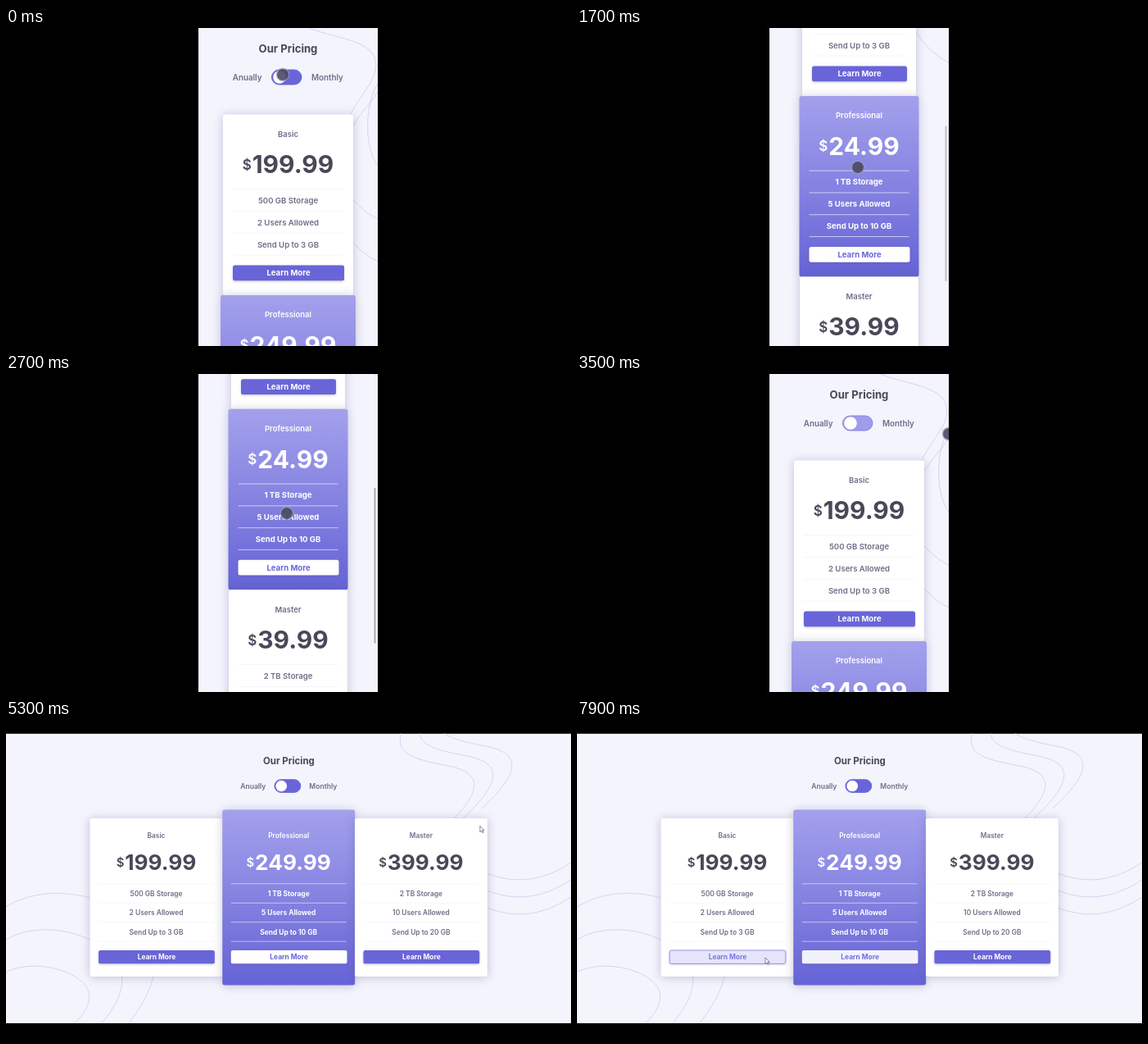
These frames come from a looping animation (690 px wide and 388 px high, 8000 ms). An HTML page with a canvas:

```html
<!DOCTYPE html>
<html lang="en">
<head>
<meta charset="utf-8">
<title>Pricing cards</title>
<style>
  html, body { margin: 0; width: 100%; height: 100%; overflow: hidden; background: #000; }
  canvas { display: block; }
</style>
</head>
<body>
<canvas id="stage" width="690" height="388"></canvas>
<script>
const ctx = document.getElementById('stage').getContext('2d');
const LOOP = 8000, STEP = 100, CUT = 4900;
const CARD_HEIGHT = 220.5, ROW = 26.8, DESKTOP_SCALE = 0.875;
const PURPLE = '#6965d8', LILAC = '#9f9ce9', INK = '#484858', MUTED = '#6f6d87';
const PAPER = '#f4f4fd', LINE = '#d5d4ee';

const PLANS = [
  { name: 'Basic', year: '199.99', month: '19.99', widths: [159, 139],
    items: ['500 GB Storage', '2 Users Allowed', 'Send Up to 3 GB'] },
  { name: 'Professional', year: '249.99', month: '24.99', widths: [165, 146], pro: true,
    items: ['1 TB Storage', '5 Users Allowed', 'Send Up to 10 GB'] },
  { name: 'Master', year: '399.99', month: '39.99', widths: [168, 145],
    items: ['2 TB Storage', '10 Users Allowed', 'Send Up to 20 GB'] },
];

// Timing: progress from 0 to 1 between two moments.
const linear = (t, from, to) => Math.min(1, Math.max(0, (t - from) / (to - from)));
const smooth = (t, from, to) => {
  const p = linear(t, from, to);
  return p * p * (3 - 2 * p);
};
const decelerate = (t, from, to) => 1 - (1 - linear(t, from, to)) ** 1.6;

// Follows moves { from, to, x, y } one after the other.
function travel(t, x, y, moves) {
  for (const move of moves) {
    const p = smooth(t, move.from, move.to);
    x += (move.x - x) * p;
    y += (move.y - y) * p;
  }
  return [x, y];
}

function mix(a, b, p) {
  const channel = (hex, i) => parseInt(hex.slice(1 + 2 * i, 3 + 2 * i), 16);
  return `rgb(${[0, 1, 2].map(i => Math.round(channel(a, i) * (1 - p) + channel(b, i) * p))})`;
}

function box(x, y, w, h, r, fill, shadow = 0, stroke) {
  ctx.save();
  ctx.beginPath();
  ctx.roundRect(x, y, w, h, r);
  ctx.shadowColor = 'rgba(80,80,140,.32)';
  ctx.shadowBlur = shadow;
  ctx.shadowOffsetY = shadow ? 1 : 0;
  ctx.fillStyle = fill;
  ctx.fill();
  ctx.restore();
  if (stroke) {
    ctx.strokeStyle = stroke;
    ctx.lineWidth = 1;
    ctx.stroke();
  }
}

function disc(x, y, r, fill) {
  ctx.beginPath();
  ctx.arc(x, y, r, 0, 7);
  ctx.fillStyle = fill;
  ctx.fill();
}

// Capital letters are centred vertically on y.
function text(str, x, y, size, color, align = 'center', weight = 600) {
  ctx.font = `${weight} ${size}px Inter, sans-serif`;
  ctx.textAlign = align;
  ctx.fillStyle = color;
  ctx.fillText(str, x, y + size * 0.364);
}

function placed(x, y, scale, draw) {
  ctx.save();
  ctx.translate(x, y);
  ctx.scale(scale, scale);
  draw();
  ctx.restore();
}

function panel(x, y, w, h, draw) {
  ctx.save();
  ctx.beginPath();
  ctx.rect(x, y, w, h);
  ctx.clip();
  ctx.fillStyle = PAPER;
  ctx.fillRect(x, y, w, h);
  draw();
  ctx.restore();
}

// Strokes copies of one curve, each placed by a matrix.
function curves(d, count = 1, matrix = () => new DOMMatrix()) {
  ctx.strokeStyle = LINE;
  ctx.lineWidth = 1;
  for (let i = 0; i < count; i++) {
    const path = new Path2D();
    path.addPath(new Path2D(d), matrix(i));
    ctx.stroke(path);
  }
}
const shifted = (dx, dy) => i => new DOMMatrix().translate(dx * i, dy * i);

// Origin: centre of the toggle.
function header(knob, hover) {
  text('Our Pricing', 0, -35, 13.1, INK, 'center', 700);
  text('Anually', -32, 0, 9.8, MUTED, 'right');
  text('Monthly', 28.5, 0, 9.8, MUTED, 'left');
  box(-20, -9, 36.5, 18, 9, mix(PURPLE, LILAC, hover), 0, mix(PURPLE, '#8784df', hover));
  disc(-10.5 + 18 * knob, 0, 7.8, '#fff');
}

// Origin: top centre of the card's content.
function card(plan, width, monthly, extra = 0, hover = 0) {
  const { pro } = plan, left = -width / 2, inner = width - 24;
  const soft = pro ? '#fff' : MUTED, strong = pro ? '#fff' : INK;
  const face = pro ? '#ffffff' : PURPLE, label = pro ? PURPLE : '#ffffff';

  let fill = '#fff';
  if (pro) {
    fill = ctx.createLinearGradient(0, -extra, 0, CARD_HEIGHT + extra);
    fill.addColorStop(0, '#a3a1ec');
    fill.addColorStop(1, '#6663d6');
  }
  box(left, -extra, width, CARD_HEIGHT + 2 * extra, 3, fill, 12);
  text(plan.name, 0, 24, 9.5, soft);

  const price = monthly ? plan.month : plan.year;
  ctx.font = '700 30px Inter, sans-serif';
  const start = -(ctx.measureText(price).width + 12) / 2;
  text('$', start, 61, 17, strong, 'left');
  text(price, start + 12, 61, 30, strong, 'left', 700);

  for (let i = 0; i < 4; i++) {
    ctx.fillStyle = pro ? 'rgba(255,255,255,.6)' : '#f6f6fb';
    ctx.fillRect(left + 12, 90.7 + ROW * i, inner, 1);
    if (i < 3) text(plan.items[i], 0, 105 + ROW * i, 9.6, soft, 'center', pro ? 700 : 600);
  }

  const edge = hover && !pro ? mix(PURPLE, '#8d8ae2', hover) : undefined;
  box(left + 12, 184, inner + 1, 18.7, 2.5, mix(face, '#e5e4fa', hover), 3, edge);
  text('Learn More', 0.5, 193.3, 9.6, mix(label, '#7c79dc', hover), 'center', 700);
}

function mobile(t) {
  const monthly = t >= 500 && t < 3300;
  const scroll = 316 * (decelerate(t, 800, 2300) - smooth(t, 2600, 3100));
  const knob = smooth(t, 400, 600) - smooth(t, 3200, 3400);
  const hover = smooth(t, 300, 600);
  const [x, y] = travel(t, 338, 57, [
    { from: 600, to: 900, x: 343, y: 170 },
    { from: 2900, to: 3100, x: 338, y: 60 },
    { from: 3300, to: 3500, x: 454, y: 73 },
  ]);

  panel(235, 0, 219, 388, () => {
    placed(0, -scroll, 1, () => {
      curves('M370 0C405 14 452 14 452 46C450 72 420 92 414 125');
      curves('M454 78C444 94 432 103 420 126M454 68C437 95 438 148 454 168');
      curves('M410 190C425 214 438 225 454 233', 2, shifted(0, 52));
      placed(344.5, 60, 1, () => header(knob, hover));
      PLANS.forEach((plan, i) => placed(344.5, 105.5 + CARD_HEIGHT * i, 1, () =>
        card(plan, plan.widths[+monthly], monthly)));
    });

    ctx.globalAlpha = smooth(t, 800, 2300) - smooth(t, 3100, 3400);
    box(449.5, scroll * 0.49, 2, 190, 1, '#a9a9b0');
    ctx.globalAlpha = 1;
    disc(x, y, 8.4, 'rgba(160,160,180,.65)');
    disc(x, y, 7, 'rgba(52,52,76,.72)');
  });
}

function arrow(x, y) {
  placed(x, y, 1, () => {
    const shape = new Path2D('M0 0V7.4L1.8 5.8L3 8.4L4.1 7.9L3 5.4H5.2Z');
    ctx.fillStyle = '#fff';
    ctx.fill(shape);
    ctx.strokeStyle = '#55556a';
    ctx.lineWidth = 0.7;
    ctx.stroke(shape);
  });
}

function desktop(t) {
  const monthly = t >= 6200 && t < 6800;
  const knob = smooth(t, 6100, 6400) - smooth(t, 6700, 6880);
  const hover = smooth(t, 5800, 6000) - smooth(t, 6800, 7200);
  const buttonHover = [
    smooth(t, 7700, 7900),
    smooth(t, 7300, 7500) - 0.5 * smooth(t, 7700, 7900),
    0,
  ];
  const pointer = travel(t, 610, 190, [
    { from: 4900, to: 5500, x: 568, y: 108 },
    { from: 5600, to: 6000, x: 344, y: 80 },
    { from: 6700, to: 6800, x: 351, y: 169 },
    { from: 7100, to: 7500, x: 345, y: 288 },
    { from: 7600, to: 7900, x: 230, y: 290 },
  ]);

  panel(0, 16.5, 690, 353.5, () => {
    curves('M484 10C472 45 502 48 545 57C586 67 578 92 535 132', 3, shifted(23, -12));
    curves('M580 184C620 202 655 197 690 174', 3, shifted(0, 21));
    curves('M0 -142C45 -170 110 -160 150 -130C195 -95 190 -50 148 2', 3,
      i => new DOMMatrix().translate(0, 370).scale(1 - 0.22 * i, 1 - 0.28 * i));
    placed(345.4, 80.5, DESKTOP_SCALE, () => header(knob, hover));
    PLANS.forEach((plan, i) => placed(183.5 + 161.7 * i, 120, DESKTOP_SCALE, () =>
      card(plan, 185, monthly, plan.pro ? 12 : 0, buttonHover[i])));
    arrow(...pointer);
  });
}

function frame(now) {
  const t = Math.floor((now % LOOP) / STEP) * STEP;
  ctx.fillStyle = '#000';
  ctx.fillRect(0, 0, 690, 388);
  (t < CUT ? mobile : desktop)(t);
  requestAnimationFrame(frame);
}
requestAnimationFrame(frame);
</script>
</body>
</html>
```
